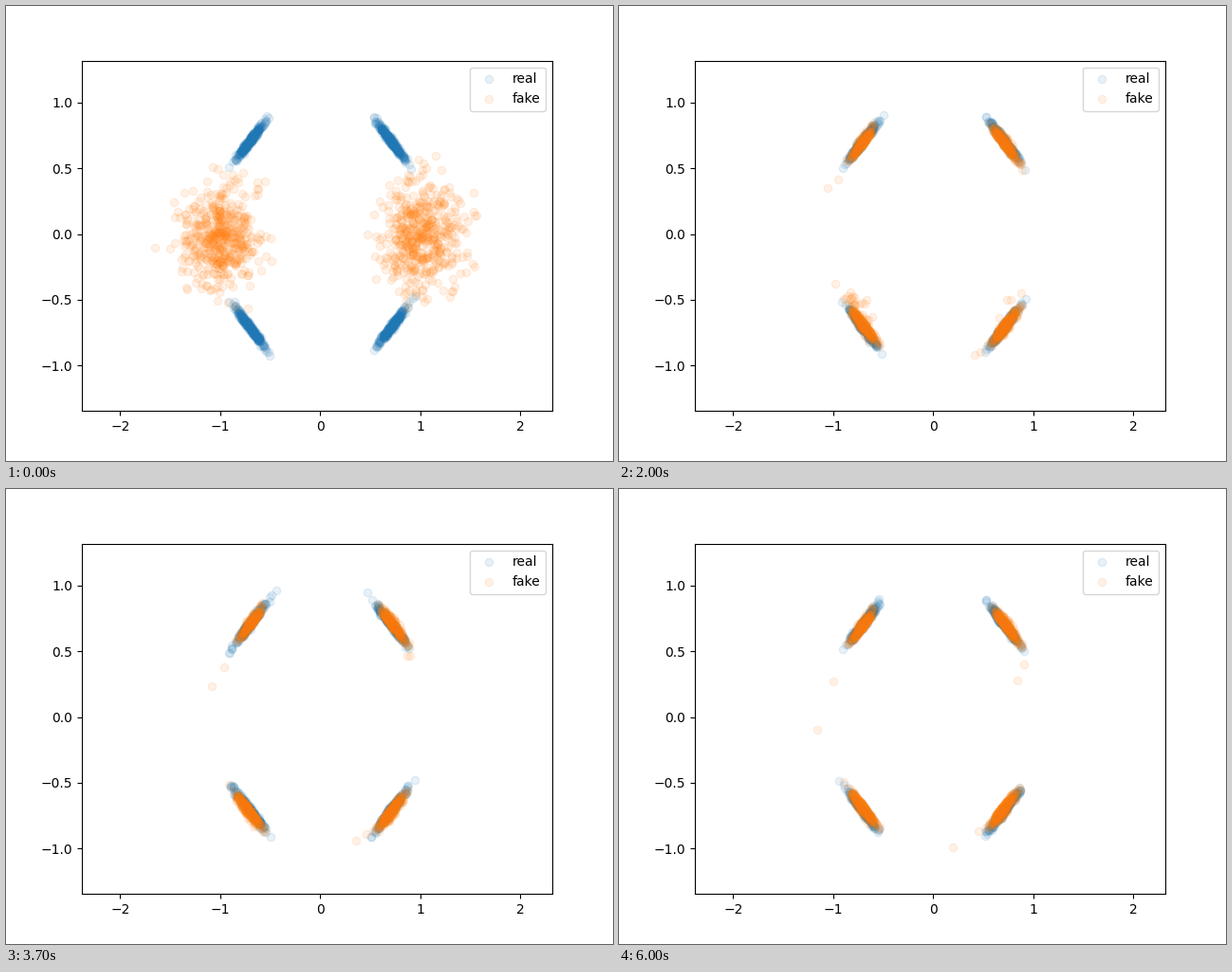
A matplotlib script that plays this animation: 640 by 480 pixels, repeating every 6.1 s.

```python
import numpy as np
import matplotlib.pyplot as plt
from matplotlib.animation import FuncAnimation

FRAMES, STEP_MS = 61, 100
PER_MODE = 250
HALF = 500
SETTLED = 12

# Corner order: upper left, upper right, lower left, lower right
SIGNS = np.array([(-1, 1), (1, 1), (-1, -1), (1, -1)])
TANGENT = np.column_stack([np.ones(4), -SIGNS[:, 0] * SIGNS[:, 1]]) / np.sqrt(2)
NORMAL = SIGNS / np.sqrt(2)

# Outliers that drift between two places after the clusters have formed
DRIFT_FROM = np.array([(-1.05, 0.36), (-0.95, 0.42), (0.42, -0.92),
                       (0.47, -0.90), (0.88, 0.54), (0.89, 0.49)])
DRIFT_TO = np.array([(-1.16, -0.10), (-1.00, 0.27), (0.20, -0.99),
                     (0.45, -0.87), (0.84, 0.28), (0.91, 0.40)])

rng = np.random.default_rng(7)
side = np.repeat([-1, 1], HALF)
noise = rng.normal(0, 0.2, (2 * HALF, 2))
start = noise + np.column_stack([side, np.zeros(2 * HALF)])
dx, dy = noise.T
corner = (side > 0) + 2 * (dy < 0)
spread = (0.43 * dx[:, None] * TANGENT[corner]
          + 0.11 * (np.abs(dy) - 0.16)[:, None] * NORMAL[corner])

# Points just under the dividing line take longer to choose a corner
late = (dy < 0) & (dy > np.where(side < 0, -0.032, -0.009))
begin = np.where(late, rng.uniform(1, 6, 2 * HALF), 0)
finish = np.where(late, rng.uniform(18, 30, 2 * HALF),
                  rng.uniform(9, 12, 2 * HALF))

# One point from the matching blob becomes each outlier
drifters = np.arange(len(DRIFT_FROM)) + HALF * (DRIFT_FROM[:, 0] > 0)
late[drifters] = False
begin[drifters], finish[drifters] = 0, SETTLED


def real_points(frame):
    gen = np.random.default_rng(100 + frame)
    mode = np.repeat(np.arange(4), PER_MODE)
    along = gen.normal(0, 0.1, (4 * PER_MODE, 1))
    across = gen.normal(0, 0.01, (4 * PER_MODE, 1))
    return 0.7071 * SIGNS[mode] + along * TANGENT[mode] + across * NORMAL[mode]


def fake_centers(frame):
    """Cluster centres, each swaying a little around its corner."""
    phase = frame / 5 + 1.6 * np.arange(4)
    sway = np.column_stack([np.sin(phase), np.cos(0.8 * phase)])
    return 0.707 * SIGNS + 0.012 * sway


def fake_points(frame):
    goal = fake_centers(frame)[corner] + spread
    drift = max(0, (frame - SETTLED) / (FRAMES - 1 - SETTLED)) ** 2
    goal[drifters] = DRIFT_FROM + drift * (DRIFT_TO - DRIFT_FROM)
    u = np.clip((frame - begin) / (finish - begin), 0, 1)
    ease = np.where(late, u * u * (3 - 2 * u), 1 - (1 - u) ** 2)
    return start + ease[:, None] * (goal - start)


fig, ax = plt.subplots(figsize=(6.4, 4.8), dpi=100)
real = ax.scatter(*real_points(0).T, alpha=0.1, label="real")
fake = ax.scatter(*fake_points(0).T, alpha=0.1, label="fake")
ax.set_xlim(-2.3831, 2.3205)
ax.set_ylim(-1.3456, 1.320)
ax.legend(loc="upper right")


def update(frame):
    real.set_offsets(real_points(frame))
    fake.set_offsets(fake_points(frame))
    return real, fake


anim = FuncAnimation(fig, update, frames=FRAMES, interval=STEP_MS,
                     repeat=True, repeat_delay=0)
plt.show()
```
